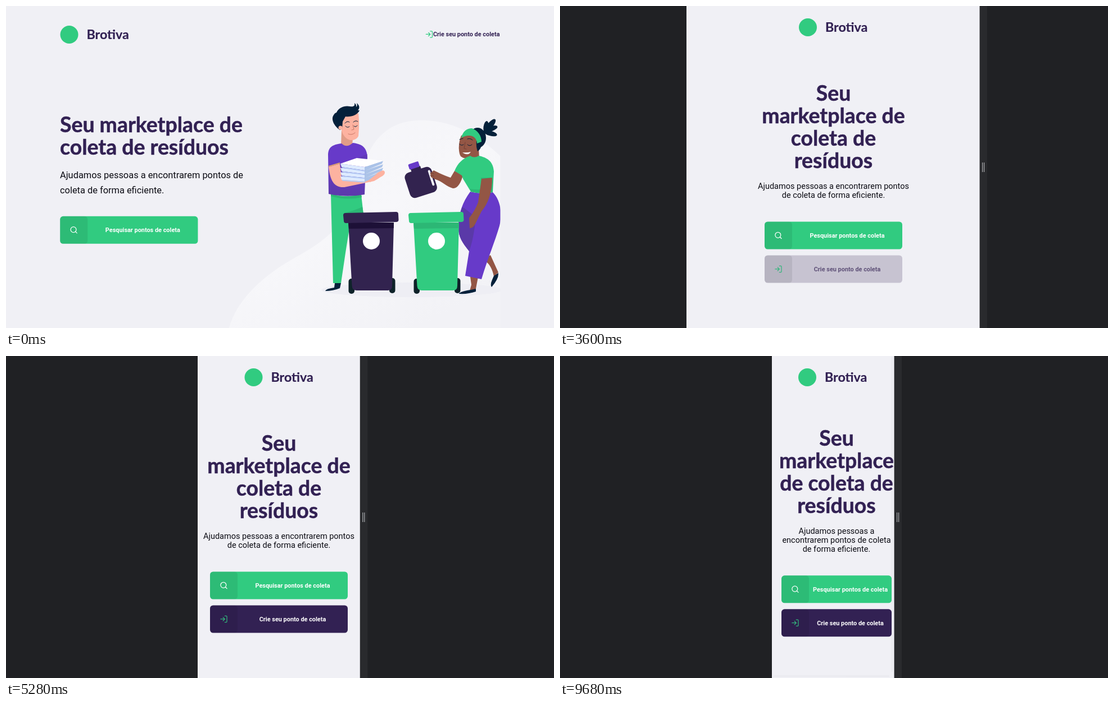
An HTML page that plays this animation: 975 px wide and 574 px high, repeating every 9.74 s.

```html
<!DOCTYPE html>
<html lang="pt-BR">
<head>
<meta charset="utf-8">
<title>Marketplace de coleta</title>
<style>
  html, body { margin: 0; width: 100%; height: 100%; overflow: hidden; background: #202124; }
  #stage { display: block; width: 975px; height: 574px; }
  .title, .brand { font: 700 37.4px Lato, sans-serif; fill: #322153; stroke: #322153; stroke-width: .5; }
  .brand { font-size: 23.3px; stroke-width: .2; }
  .lead { font: 16.4px Roboto, sans-serif; fill: #0c0c14; }
  .small { font-size: 14.5px; }
  .label { font: 700 10.9px Roboto, sans-serif; fill: #fff; }
  .link { fill: #322153; }
  .mid { text-anchor: middle; }
  .end { text-anchor: end; }
  .icon { fill: none; stroke-width: 2; stroke-linecap: round; stroke-linejoin: round; }
  .create > .box { fill-opacity: var(--fill); }
  .create .label { fill: color-mix(in srgb, #fff calc(var(--fill) * 100%), #322153); }
  .skin { fill: #fdb2a0; } .brown { fill: #935645; } .ink { fill: #04203a; }
  .green { fill: #31cb80; } .moss { fill: #2cb775; } .violet { fill: #673ac9; } .shade { fill: #5a39a8; }
  .plum { fill: #32234f; } .night { fill: #1d1037; } .tyre { fill: #0e2229; }
  .line { fill: none; stroke: #04203a; stroke-width: 1; stroke-linecap: round; }
</style>
</head>
<body>
<svg id="stage" viewBox="0 0 975 574">
  <defs>
    <linearGradient id="mist" x1="0" y1="0" x2=".7" y2="1">
      <stop offset="0" stop-color="#f4f4f8"/><stop offset=".55" stop-color="#f7f7fa"/><stop offset="1" stop-color="#f2f2f6"/>
    </linearGradient>
    <linearGradient id="shirt" x1="0" y1="0" x2="0" y2="1">
      <stop offset=".3" stop-color="#673ac9"/><stop offset="1" stop-color="#5c39aa"/>
    </linearGradient>
  </defs>
  <rect width="975" height="574" fill="#202124"/>
  <g id="handle">
    <rect width="13.5" height="574" fill="#292a2d"/>
    <path d="M5 279v17M8 279v17" stroke="#a9abae" stroke-width="1.2"/>
  </g>
  <svg id="page" height="574">
    <rect width="975" height="574" fill="#f0f0f5"/>
    <svg id="art" height="574"><g id="scene">
      <path fill="url(#mist)" d="M397 574C408 530 450 485 510 451C548 430 575 412 592 388C622 345 632 268 662 236C690 205 722 203 750 204C806 208 846 236 880 268V574Z"/>
      <ellipse cx="722" cy="506" rx="161" ry="13" fill="#eeeef4"/>

      <!-- man -->
      <path class="green" d="M578 335Q606 343 632 336L636 372 612 390 604 440 596 494H582Z"/>
      <path class="moss" d="M578 335Q606 343 632 336L633 341Q606 347 578 339ZM602 369Q622 364 634 358L636 370H602Z"/>
      <path class="ink" d="M585 494H596L594 503Q582 508 568 508 569 504 584 502Z"/>
      <path fill="#e19c87" d="M597 222L617 236 616 249Q606 254 596 248Z"/>
      <path class="skin" d="M597 199L627 191C629 210 628 220 627 232Q623 240 612 239 601 236 597 222Z"/>
      <path class="ink" d="M594 221C586 216 578 204 582 196Q585 190 588 190C592 181 602 177 612 179 619 180 621 178 620 173Q624 176 623 180 626 178 624 173C629 177 630 182 626 186H629C625 195 614 198 604 197L599 206 598 219Z"/>
      <circle class="skin" cx="595" cy="217" r="3.5"/>
      <path class="line" d="M603 209Q607 204 611 207M618 207Q622 203 626 206" stroke-width="1.7"/>
      <path class="line" d="M604 214Q607 218 611 215M619 214Q622 217 625 213"/>
      <path class="line" d="M617 212L619 220 615 221M609 228Q615 231 621 226" style="stroke:#c97868"/>
      <path fill="url(#shirt)" d="M597 245C584 247 574 249 573 264L574 335Q606 342 638 336L639 312 643 270C642 252 634 246 617 244Q606 254 597 245Z"/>
      <path class="shade" d="M594 283L643 264 642 290 600 312Z" opacity=".5"/>
      <path class="skin" d="M574 287L594 281 597 307 640 310 663 296C670 291 676 293 673 299 669 304 660 309 655 312L602 323C584 324 577 312 574 287Z"/>
      <path d="M574 286L594 280" stroke="#dfa06f" stroke-width="2"/>
      <g id="papers"></g>
      <path class="skin" d="M645 311L660 299Q672 290 674 297 674 303 660 307L648 314Z"/>

      <!-- woman -->
      <g class="ink">
        <ellipse cx="839" cy="235" rx="15" ry="18"/>
        <ellipse cx="854" cy="216" rx="4.5" ry="11" transform="rotate(8 854 216)"/>
        <ellipse cx="862" cy="212" rx="5" ry="13" transform="rotate(40 862 212)"/>
        <ellipse cx="863" cy="219" rx="4.5" ry="12" transform="rotate(70 863 219)"/>
        <ellipse cx="862" cy="227" rx="4.5" ry="12" transform="rotate(104 862 227)"/>
      </g>
      <path class="brown" d="M856 447L862 444 876 475 868 482Q864 462 852 454ZM826 483H840L835 509 824 511 828 497Z"/>
      <path class="ink" d="M876 476Q877 486 864 501 861 497 865 488L868 481ZM806 512Q812 508 827 506L836 504V509Q822 514 806 513Z"/>
      <path class="violet" d="M826 331Q845 336 866 332C881 347 883 372 878 392 870 420 857 450 846 487L817 481 824 437C812 422 805 412 805 395 805 370 812 350 826 331Z"/>
      <path class="shade" d="M812 358C806 372 805 385 805 395 805 412 812 422 824 437Q832 416 836 376Z"/>
      <path class="brown" d="M824 258L841 254 842 271Q833 276 825 270Z"/>
      <path class="brown" d="M810 231C804 245 805 262 809 268Q818 275 831 268L842 254 838 232Q824 224 810 231Z"/>
      <path class="ink" d="M837 240Q846 238 846 246 845 256 839 259 836 250 837 240Z"/>
      <path class="green" d="M810 235C813 223 820 218 829 218 840 222 846 232 846 242L838 245C838 237 832 231 824 231 818 231 814 233 810 235Z"/>
      <path class="line" d="M807 238L813 236M821 237Q826 235 830 239" stroke-width="1.6"/>
      <path class="line" d="M807 246Q810 250 814 247M821 247Q825 251 829 247"/>
      <path class="line" d="M817 243L815 254 819 255" style="stroke:#713e34"/>
      <path fill="#fff" d="M812 261Q820 262 827 260 822 268 812 261Z"/>
      <path class="brown" d="M798 294L813 301C810 315 803 326 795 325 784 322 775 312 764 309L756 305 754 300 761 294 769 297Q782 303 791 306Z"/>
      <path class="green" d="M826 267C812 272 804 280 798 294L811 302 813 308 827 331Q846 336 866 332L868 295C867 277 856 270 841 267Q833 272 826 267Z"/>
      <path class="moss" d="M845 306H865L866 332Q846 336 827 331L826 326Q836 328 845 327Z"/>
      <path class="brown" d="M846 308L865 306C865 332 858 352 846 366L838 382Q832 397 825 396L824 378Q835 364 840 350Z"/>

      <!-- bottle -->
      <g transform="translate(738 314) rotate(-18)">
        <path class="plum" d="M-10 -28H8V-20H-10Z"/>
        <rect class="violet" x="-12" y="-37" width="19" height="10" rx="2"/>
        <rect class="plum" x="-25" y="-23" width="50" height="47" rx="9"/>
        <path d="M20 -14V11" stroke="#f4f4fa" stroke-width="4" stroke-linecap="round"/>
      </g>
      <path class="brown" d="M755 298L761 293 769 297 772 304 764 309 756 305Z"/>
      <path class="line" d="M755 298L761 299M755 302L761 303" style="stroke:#6f3d32"/>
      <g id="bins"></g>
    </g></svg>
    <g id="ui"></g>
    <g id="bars" fill="#808080" fill-opacity=".5">
      <rect x="212.5" y="1" width="2.5" height="562" rx="1.2"/>
      <rect x="3" y="569.5" width="206" height="2.5" rx="1.2"/>
    </g>
  </svg>
</svg>
<script>
const LOOP = 9740;
const $ = id => document.getElementById(id);
const set = (id, attrs) => Object.entries(attrs).forEach(([k, v]) => $(id).setAttribute(k, v));
const clamp = v => Math.min(1, Math.max(0, v));

// drawing helpers
const poly = (points, fill) => `<polygon points="${points}" fill="${fill}"/>`;
const text = (cls, x, y, s) => `<text class="${cls}" x="${x}" y="${y}">${s}</text>`;
const lines = (cls, x, y, step, list) => list.map((s, i) => text(cls, x, y + i * step, s)).join('');
const icon = (x, y, color, shape) =>
  `<g class="icon" stroke="${color}" transform="translate(${x} ${y}) scale(.62)">${shape}</g>`;
const SEARCH = '<circle cx="11" cy="11" r="8"/><path d="M21 21l-4.4-4.4"/>';
const ENTER = '<path d="M15 3h4a2 2 0 0 1 2 2v14a2 2 0 0 1-2 2h-4M10 17l5-5-5-5M15 12H3"/>';

const brand = (x, y) =>
  `<circle cx="${x}" cy="${y}" r="16" fill="#31cb80"/>` + text('brand', x + 31, y + 8, 'Brotiva');

const button = (cls, x, y, w, fill, tint, shape, label) => `<g class="${cls}">
  <rect class="box" x="${x}" y="${y}" width="${w}" height="49" rx="5.4" fill="${fill}"/>
  <rect x="${x}" y="${y}" width="49" height="49" rx="5.4" fill="#000" fill-opacity=".08"/>
  ${icon(x + 17, y + 17, tint, shape)}${text('label mid', x + 24.5 + w / 2, y + 28.3, label)}</g>`;
const searchButton = (x, y, w) =>
  button('search', x, y, w, '#31cb80', '#fff', SEARCH, 'Pesquisar pontos de coleta');
const createButton = (x, y, w) =>
  button('create', x, y, w, '#322153', '#33b57c', ENTER, 'Crie seu ponto de coleta');

// page layouts, in coordinates of the visible page
const wide = (left, right, shift) => ({
  art: { right, shift },
  html: brand(left + 16.5, 51)
    + icon(right - 134, 43, '#31cb80', ENTER)
    + text('label link end', right - 1, 54.3, 'Crie seu ponto de coleta')
    + lines('title', left, 225, 40, ['Seu marketplace de', 'coleta de resíduos'])
    + lines('lead', left, 307, 26.5, ['Ajudamos pessoas a encontrarem pontos de', 'coleta de forma eficiente.'])
    + searchButton(left + .2, 374.8, 245.2)
});
const narrow = (logo, mid, top, title, lead, y, w) => ({
  html: brand(logo, 38)
    + lines('title mid', mid, top, 40, title)
    + lines('lead small mid', mid, top + 156.7, 16.2, lead)
    + searchButton(mid - w / 2, y, w)
    + createButton(mid - w / 2, y + 60, w)
});
const tabletTitle = ['Seu', 'marketplace de', 'coleta de', 'resíduos'];
const phoneTitle = ['Seu', 'marketplace', 'de coleta de', 'resíduos'];
const tabletLead = ['Ajudamos pessoas a encontrarem pontos', 'de coleta de forma eficiente.'];

const full = wide(96, 879.5, 0);
const laptop = wide(35.7, 663, -180.5);
const tablet = narrow(216, 261.5, 169, tabletTitle, tabletLead, 384.5, 245);
const phoneL = narrow(99.5, 144.5, 169, tabletTitle, tabletLead, 384.5, 245);
const phoneM = narrow(82.5, 127.7, 161, phoneTitle,
  ['Ajudamos pessoas a encontrarem', 'pontos de coleta de forma', 'eficiente.'], 392.5, 217.5);
const phoneS = narrow(63, 115, 160, phoneTitle,
  ['Ajudamos pessoas a', 'encontrarem pontos de coleta', 'de forma eficiente.'], 391.3, 196);

// start time, page left, page right, layout; a resize shows the old layout briefly
const shots = [
  [0, 0, 975, full],
  [1520, 138, 833.6, laptop],
  [3510, 225, 746.6, laptop],
  [3540, 225, 746.6, tablet],
  [5250, 341, 629.8, tablet],
  [5280, 341, 629.8, phoneL],
  [7140, 358, 612.8, phoneM],
  [9170, 377, 594.6, phoneS]
];

$('papers').innerHTML = [3, 2, 1, 0].map(i => {
  const y = i * 7.6, near = i * 6.6, far = i * 6.2;
  return poly(`595,${281 + y} 638,${287 + near} 638,${293 + near} 597,${287 + y}`, '#deebff')
    + poly(`597,${287 + y} 638,${293 + near} 638,${295 + near} 599,${289 + y}`, '#b4ccf5')
    + poly(`638,${287 + near} 671,${276 + far} 669,${281 + far} 638,${294 + near}`, '#abc3e8');
}).join('') + poly('595,281 624,271 671,276 638,287', '#fff');

const bin = (x, main, shade) => `<g transform="translate(${x} 0)">
  <rect class="tyre" x="9.5" y="486" width="10.5" height="27" rx="5"/>
  <rect class="tyre" x="82" y="485" width="10.5" height="27" rx="5"/>
  <path class="${main}" d="M9 386H90L87 499Q87 507 79 507H24Q16 507 15.500 499Z"/>
  <path class="${shade}" d="M9 386H90L89.700 396 10 397Z"/>
  <path class="${main}" d="M4 369L94 367Q98 367 98 371L98.500 381Q98.500 385 94 385L5 387Q1 387 1 383L0 373Q0 369 4 369Z"/>
  <circle cx="50" cy="419" r="15" fill="#fff"/></g>`;
$('bins').innerHTML = bin(600, 'plum', 'night') + bin(716, 'green', 'moss');

let current;
function show(shot) {
  const [, left, right, { art, html }] = shot;
  set('page', { x: left, width: right - left });
  set('handle', { transform: `translate(${right} 0)` });
  set('art', { display: art ? 'inline' : 'none', width: art ? art.right : 0 });
  set('scene', { transform: `translate(${art ? art.shift : 0} 0)` });
  $('ui').innerHTML = html;
  current = shot;
}

const start = performance.now();
function frame() {
  const t = (performance.now() - start) % LOOP;
  const shot = shots.findLast(s => s[0] <= t);
  if (shot !== current) show(shot);
  $('stage').style.setProperty('--fill', clamp((t - 3540) / 280));
  set('bars', { opacity: t < 9170 ? 0 : clamp((9700 - t) / 170) });
  requestAnimationFrame(frame);
}
frame();
</script>
</body>
</html>
```
